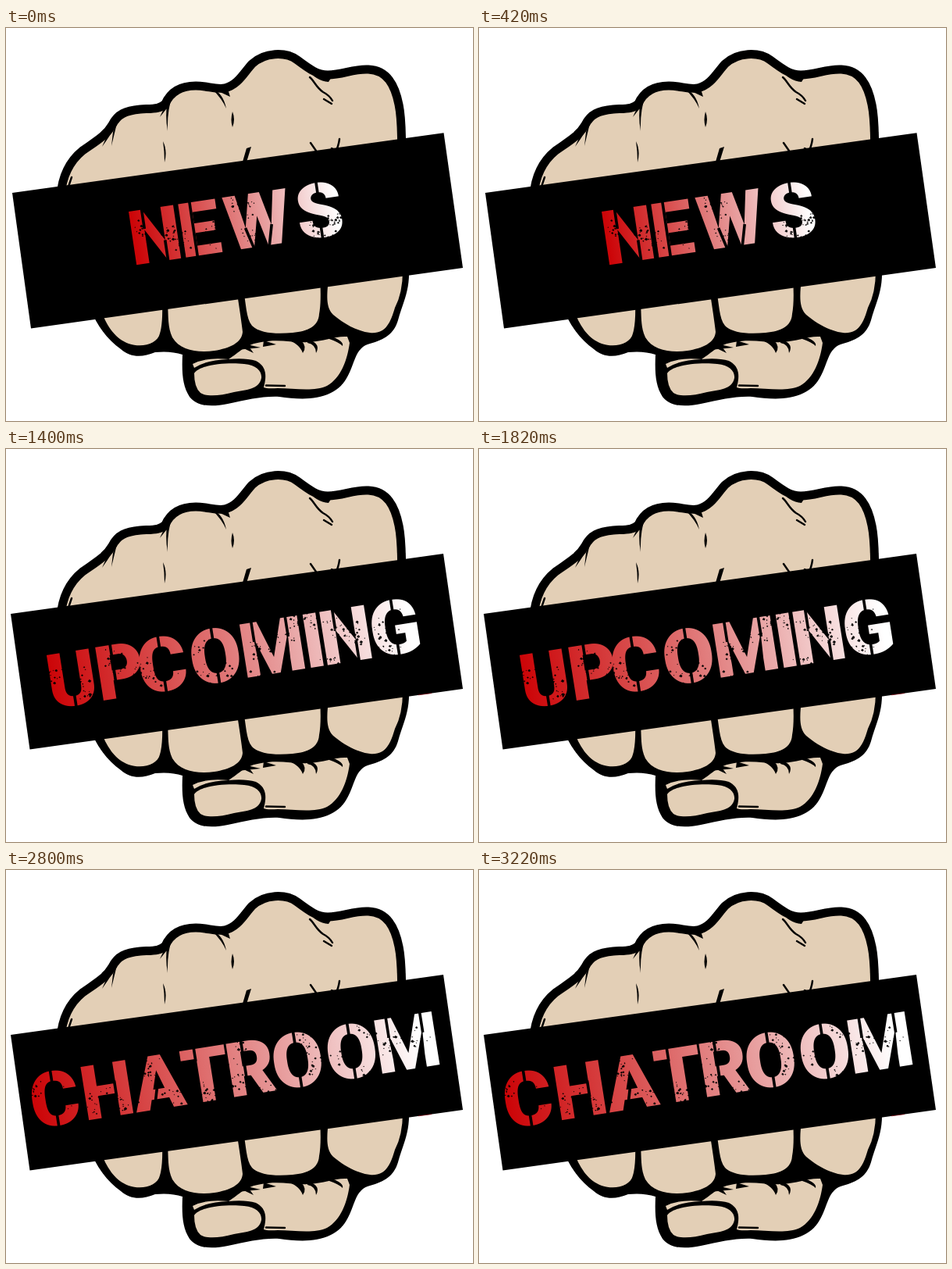
An HTML page that plays this animation: 598 by 503 pixels, repeating every 3.5 s.

```html
<!DOCTYPE html>
<html lang="en">
<head>
<meta charset="utf-8">
<title>Fist banner</title>
<style>
html, body { margin: 0; width: 100%; height: 100%; overflow: hidden; background: #fff; }
svg { display: block; width: 100%; height: 100%; }
text { font: 900 97px Roboto, "Open Sans", sans-serif; text-anchor: middle; }
.skin { fill: #e3cfb6; }
.crease { fill: none; stroke: #000; stroke-width: 2.4; stroke-linecap: round; stroke-linejoin: round; }
.gap { fill: none; stroke: #000; stroke-width: 3.6; }
</style>
</head>
<body>
<svg viewBox="0 0 598 503" xmlns="http://www.w3.org/2000/svg">
  <defs id="defs"></defs>

  <!-- back of the hand -->
  <path class="skin" stroke="#000" stroke-width="11" stroke-linejoin="round" d="M70 215 C72 188 82 170 98 157 C115 145 128 138 136 124
    C143 110 153 106 172 104 C188 103 197 104 204 97 C211 81 224 74 243 74 C258 74 268 79 280 77
    C297 73 304 58 315 46 C331 31 358 30 373 41 C389 53 399 60 412 60 C432 60 444 52 464 53
    C488 54 498 73 503 98 C507 117 506 132 507 160 V240 H70Z"/>
  <!-- tapered folds -->
  <path d="M146 113 Q141 127 123 152 L131 134Z M142 122 L135 151 L137 133Z
    M213 86 Q206 107 207 132 Q204 116 206 98Z M209 99 L197 114 L203 101Z
    M264 78 Q278 83 282 103 Q277 91 264 78Z M270 80 L287 88 L284 78Z
    M201 145 Q207 157 203 172 Q203 158 201 145Z M290 107 Q294 117 290 127 Q287 118 290 107Z
    M308 154 L314 152 L306 178 H301Z M384 51 Q397 68 413 69 L420 58Z"/>
  <g class="crease">
    <path d="M389 63 C395 68 397 76 406 82 Q414 86 418 93 M407 91 L417 97"/>
    <path d="M390 147 L399 160 M427 142 Q426 151 421 161 M417 154 L424 157 M84 191 L80 203"/>
  </g>

  <!-- curled fingers and thumb -->
  <path d="M108 360 C117 381 129 398 147 411 C160 422 174 422 191 415 Q211 413 226 418
    C225 442 226 458 235 472 C245 485 264 485 284 481 C309 476 328 471 350 472 C372 475 396 477 416 467
    C437 457 441 437 447 423 Q453 407 466 404 C485 399 497 391 502 374 C507 354 517 338 516 310 L300 330Z"/>
  <g class="skin">
    <path d="M121 360 C130 384 141 398 157 404 C175 410 194 404 197 391 Q201 378 200 350 L119 345Z"/>
    <path d="M207 350 C208 370 207 383 213 396 C223 413 246 416 267 413 C286 410 302 403 303 389 Q301 372 296 340Z"/>
    <path d="M303 330 C308 354 307 371 315 381 C325 391 347 392 367 390 C387 388 400 382 401 366 Q404 350 402 320Z"/>
    <path d="M413 320 C411 341 409 357 419 367 C432 378 449 388 466 390 C486 392 492 378 498 358 Q508 339 508 310Z"/>
    <path d="M241 442 C249 430 285 428 305 430 C321 431 328 440 327 448 C324 463 307 463 292 466 C274 471 256 472 249 467 Q241 460 241 442Z"/>
    <path d="M285 424 C299 415 306 405 327 402 C351 397 370 404 387 402 C408 401 421 394 437 395 L440 403
      C437 425 429 448 411 458 C394 466 369 461 348 461 Q334 462 330 460 C335 443 332 432 320 426 Q306 422 285 424Z"/>
    <path d="M239 430 Q256 421 285 424 Q256 425 241 435Z"/>
  </g>
  <path d="M296 412 L326 409 L304 404Z M300 408 L317 416 L309 405Z M329 408 L346 405 L330 400Z
    M358 398 Q376 404 380 416 Q386 408 378 400Z M386 398 Q404 404 397 416 Q397 405 386 403Z M414 394 Q433 400 431 407 Q426 402 414 398Z"/>
  <path class="crease" d="M333 457.5 L357 458"/>

  <polygon id="banner"/>
  <g id="words"></g>
  <path id="glint" d="M528 314.8 L545 312.6" stroke="#7d0c16" stroke-width=".8"/>
  <path id="dashes" d="M31 382 L7.5 212 L560 135" fill="none" stroke="#fff" stroke-width="1" stroke-dasharray="4 3"/>
</svg>
<script>
const HOLD = 700;
const byId = id => document.getElementById(id);

// Baseline origin, tilt, and the centre of each letter along the baseline
const words = [
  { text: "NEWS", at: [168, 303], tilt: -8.5, x: [28, 85, 161, 241] },
  { text: "VIDEOS", at: [178, 314], tilt: -9.3, x: [0, 38, 79, 138, 197, 262] },
  { text: "UPCOMING", at: [62, 332], tilt: -9, x: [28, 90, 145, 214, 288, 341, 383, 447], wide: true },
  { text: "PODCAST", at: [105, 319], tilt: -9, x: [27, 88, 151, 215, 284, 345, 399], wide: true, dashed: true },
  { text: "CHATROOM", at: [107, 320], tilt: -9, x: [-40, 28, 94, 156, 214, 275, 345, 417], wide: true }
];

// Stencil cuts, relative to a letter's centre on the baseline
const round = "M0 -73V-50M0 -20V3";
const cuts = {
  O: round, C: round, G: round, S: "M1 -73V-54M-1 -16V3", U: "M0 -22V3",
  D: "M-8 -71V-52M-8 -18V1", P: "M-7 -71V-54M-7 -40V-20", R: "M-7 -71V-54M-7 -40V-22",
  E: "M-7 -71V1", H: "M11 -45V-24", T: "M-10 -71V-53", A: "M-2 -28L-10 1",
  N: "M-12 -71V-44M12 -26V1", W: "M-17 -26L-10 1M17 -26L10 1",
  M: "M-22 -71V-44M22 -71V-44", V: "M-4 -24L5 1", I: ""
};

function random(seed) {
  return () => (seed = (seed * 16807) % 2147483647) / 2147483647;
}

// Worn specks gathered around a few spots in every letter
function specks(xs, seed) {
  const rnd = random(seed);
  let d = "";
  for (const x of xs) {
    for (let spot = 0; spot < 3; spot++) {
      const cx = x + (rnd() - 0.5) * 50, cy = -rnd() * 62;
      for (let i = 0; i < 15; i++) {
        const px = cx + (rnd() + rnd() - 1) * 19, py = cy + (rnd() + rnd() - 1) * 17;
        const r = 0.35 + rnd() ** 3 * 1.5;
        d += `M${px.toFixed(1)} ${py.toFixed(1)}l${r} ${-r}l${r} ${r * 0.8}l${-r * 0.6} ${r}Z`;
      }
    }
  }
  return d;
}

function gradient(id, from, to) {
  return `<linearGradient id="${id}" gradientUnits="userSpaceOnUse" x1="${from}" y1="0" x2="${to}" y2="0">
    <stop offset="0" stop-color="#cc0508"/><stop offset=".3" stop-color="#d84c4c"/>
    <stop offset=".66" stop-color="#e9a6a6"/><stop offset=".98" stop-color="#fff"/></linearGradient>`;
}

function lettering(word, i) {
  const { text, at, tilt, x } = word;
  const gaps = [...text].map((c, k) =>
    `<path class="gap" transform="translate(${x[k]})" d="${cuts[c]}"/>`).join("");
  return `<g transform="translate(${at}) rotate(${tilt})">
    <text x="${x.join(" ")}" y="0" fill="url(#tint${i})">${text}</text>
    ${gaps}<path d="${specks(x, 4711 + i * 977)}" stroke="#000" stroke-width=".6"/></g>`;
}

byId("defs").innerHTML = words.map((w, i) =>
  gradient("tint" + i, w.x[0] - 26, w.x[w.x.length - 1] + 28)).join("");
byId("words").innerHTML = words.map(lettering).join("");
const groups = [...byId("words").children];

const show = (el, on) => el.setAttribute("visibility", on ? "visible" : "hidden");

function draw(time) {
  const now = Math.floor(time / HOLD) % words.length;
  const { wide, dashed } = words[now];
  groups.forEach((g, i) => show(g, i === now));
  byId("banner").setAttribute("points", wide
    ? "6,211 560,134 585,307 30.5,384.5"
    : "8,211 560.5,134.3 585,307 32,384.5");
  show(byId("glint"), wide && !dashed);
  show(byId("dashes"), dashed);
}

const start = performance.now();
function tick() {
  draw(performance.now() - start);
  requestAnimationFrame(tick);
}
tick();
</script>
</body>
</html>
```
